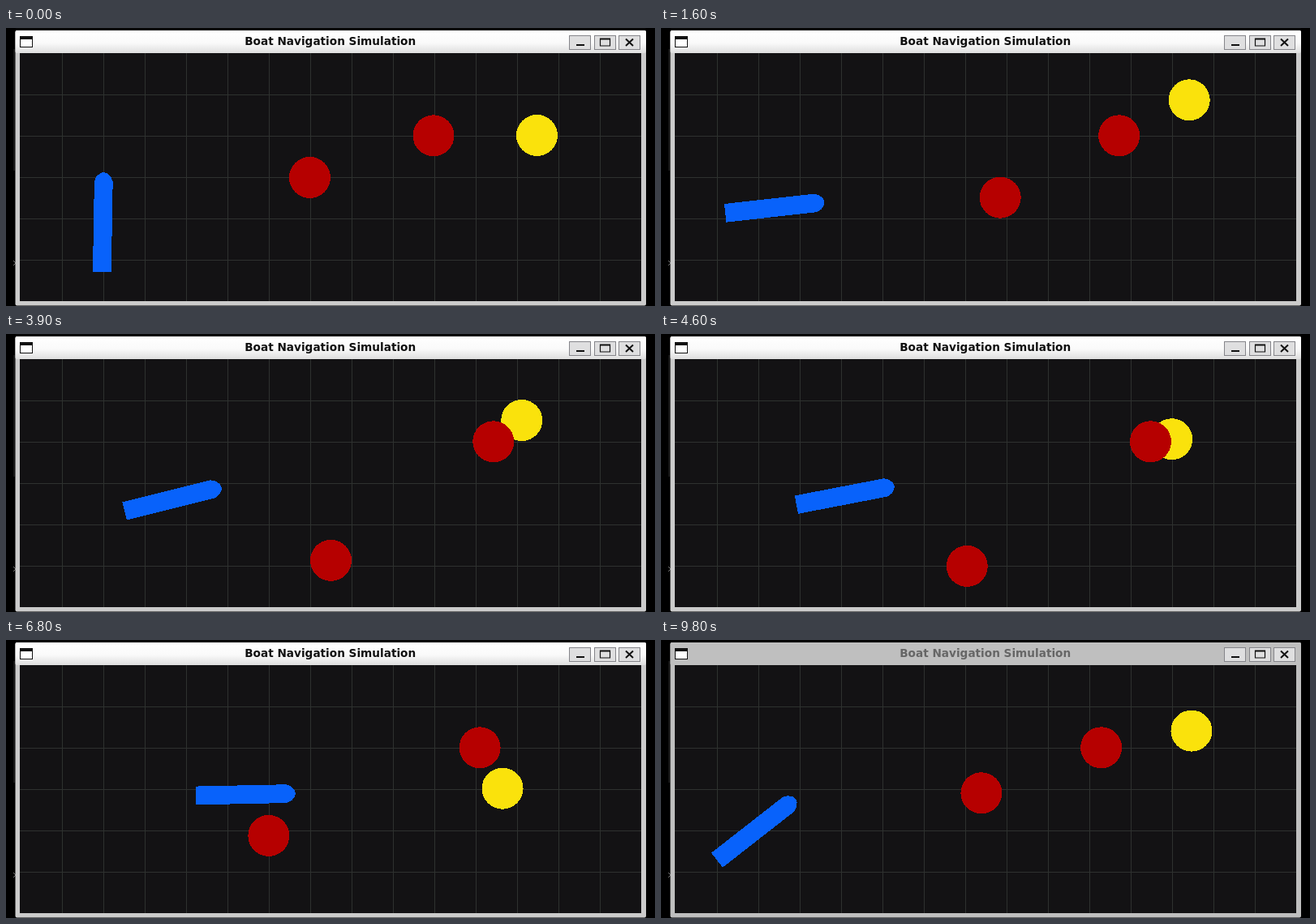
An HTML page that plays this animation: 800 by 343 pixels, repeating every 9.9 s.

```html
<!DOCTYPE html>
<html lang="en">
<head>
<meta charset="utf-8">
<title>Boat Navigation Simulation</title>
<style>
  html, body { margin: 0; width: 100%; height: 100%; overflow: hidden; background: #000; }
  svg { display: block; width: 800px; height: 343px; }
  .crisp { shape-rendering: crispEdges; }
  .title { font: bold 13.65px "DejaVu Sans", sans-serif; text-anchor: middle; fill: #111; }
  .frame { fill: #cbcbcb; }
  .button rect { fill: #dfdfe0; stroke: #85858a; }
  .glyph { fill: none; stroke: #111; stroke-width: 2; }
  .inactive .title { fill: #666; }
  .inactive .frame, .inactive .bar { fill: #bfbfbf; }
</style>
</head>
<body>
<svg id="stage" viewBox="0 0 800 343">
  <defs>
    <linearGradient id="shine" x1="0" y1="0" x2="0" y2="1">
      <stop offset="0" stop-color="#fff"/>
      <stop offset=".55" stop-color="#fafafa"/>
      <stop offset="1" stop-color="#dedede"/>
    </linearGradient>
    <clipPath id="view"><rect x="17" y="31" width="766" height="306"/></clipPath>
  </defs>
  <rect width="800" height="343"/>
  <path d="M9 287l3 3l-3 3" fill="none" stroke="#777"/>
  <rect x="9" y="26" width="2" height="150" fill="#171717"/>

  <rect class="frame" x="11.5" y="3" width="777.5" height="339.5" rx="2"/>
  <rect class="bar" x="11.5" y="3" width="777.5" height="28" rx="2" fill="url(#shine)"/>
  <text class="title" x="399.7" y="21.4">Boat Navigation Simulation</text>
  <g class="crisp">
    <rect x="17.5" y="10.5" width="15" height="13" fill="#fff" stroke="#111"/>
    <rect x="17" y="10" width="16" height="4" fill="#111"/>
  </g>
  <g class="button">
    <rect x="694.5" y="9.5" width="26" height="17"/>
    <rect x="725.5" y="9.5" width="26" height="17"/>
    <rect x="755.5" y="9.5" width="26" height="17"/>
  </g>
  <path class="glyph" d="M703 21h10M764 13.5l9 8.5M773 13.5l-9 8.5"/>
  <path d="M732.5 13h12v9h-12zM732 14h13" fill="none" stroke="#111" stroke-width="1.2"/>

  <g class="crisp" clip-path="url(#view)">
    <rect x="17" y="31" width="766" height="306" fill="#131214"/>
    <path id="grid" fill="none" stroke="#2e312f"/>
    <circle id="goal" r="25.5" fill="#fae20c"/>
    <circle id="orbiter" r="25.5" fill="#b60000"/>
    <circle id="slider" r="25.5" fill="#b60000"/>
    <path id="boat" fill="#0862fb" d="M-66-11.4H46L52-8.6L56-4L57 0L56 4L52 8.6L46 11.4H-66Z"/>
  </g>
</svg>
<script>
const LOOP = 9900, STEP = 100;
const RESTART = 73, HALT = 80;   // in steps
const CELL = 51, LEFT = 17.5, BOTTOM = 337.5;
const SPEED = 0.686, DELAY = 0.1;

// time (s), x, y, heading (deg)
const course = [
  [0, 119.5, 235, 89],
  [0.4, 119.7, 233.5, 65],
  [0.7, 121, 231, 38],
  [1.0, 128.7, 226.4, 10],
  [1.3, 136.8, 223.4, 5],
  [1.6, 144.8, 221, 6.4],
  [2.2, 161.5, 216.3, 12.5],
  [3.0, 184.6, 209.8, 16],
  [3.9, 210.2, 202.5, 14],
  [5.4, 256.7, 194.1, 7.1],
  [6.8, 300, 190.6, 1.2],
  [7.4, 318.5, 190.5, -0.8]
];

const $ = id => document.getElementById(id);
const px = c => LEFT + c * CELL;
const py = c => BOTTOM - c * CELL;

function slope(i, k) {
  const a = course[Math.max(i - 1, 0)];
  const b = course[Math.min(i + 1, course.length - 1)];
  return (b[k] - a[k]) / (b[0] - a[0]);
}

// Cubic Hermite curve through the course points
function along(t, k) {
  let i = 0;
  while (i < course.length - 2 && t >= course[i + 1][0]) i++;
  const a = course[i], b = course[i + 1];
  const h = b[0] - a[0], u = (t - a[0]) / h, v = 1 - u;
  return v * v * ((1 + 2 * u) * a[k] + u * h * slope(i, k))
       + u * u * ((1 + 2 * v) * b[k] - v * h * slope(i + 1, k));
}

function place(id, x, y) {
  $(id).setAttribute("transform", `translate(${x.toFixed(2)} ${y.toFixed(2)})`);
}

function draw(ms) {
  const step = Math.floor((ms % LOOP) / STEP);
  const t = (step < RESTART ? step : Math.min(step, HALT) - RESTART) / 10;
  const p = SPEED * Math.max(0, t - DELAY);

  place("orbiter", px(7 + Math.sin(p)), py(2 + Math.cos(p)));
  place("slider", px(10 + 1.5 * Math.sin(p / 2)) - 0.5, py(4) - 0.7);
  place("goal", px(12 + 0.5 * Math.cos(p / 2)) - 0.5, py(4 + Math.sin(p)) - 1);
  $("boat").setAttribute("transform",
    `translate(${along(t, 1)} ${along(t, 2)}) rotate(${-along(t, 3)})`);
  $("stage").classList.toggle("inactive", step >= HALT);
}

let lines = "";
for (let i = 1; i < 15; i++) lines += `M${px(i) + 1} 31V337`;
for (let i = 1; i < 6; i++) lines += `M17 ${py(i) - 0.5 + 0.5}H783`;
$("grid").setAttribute("d", lines);

const start = performance.now();
(function tick() {
  draw(performance.now() - start);
  requestAnimationFrame(tick);
})();
</script>
</body>
</html>
```
